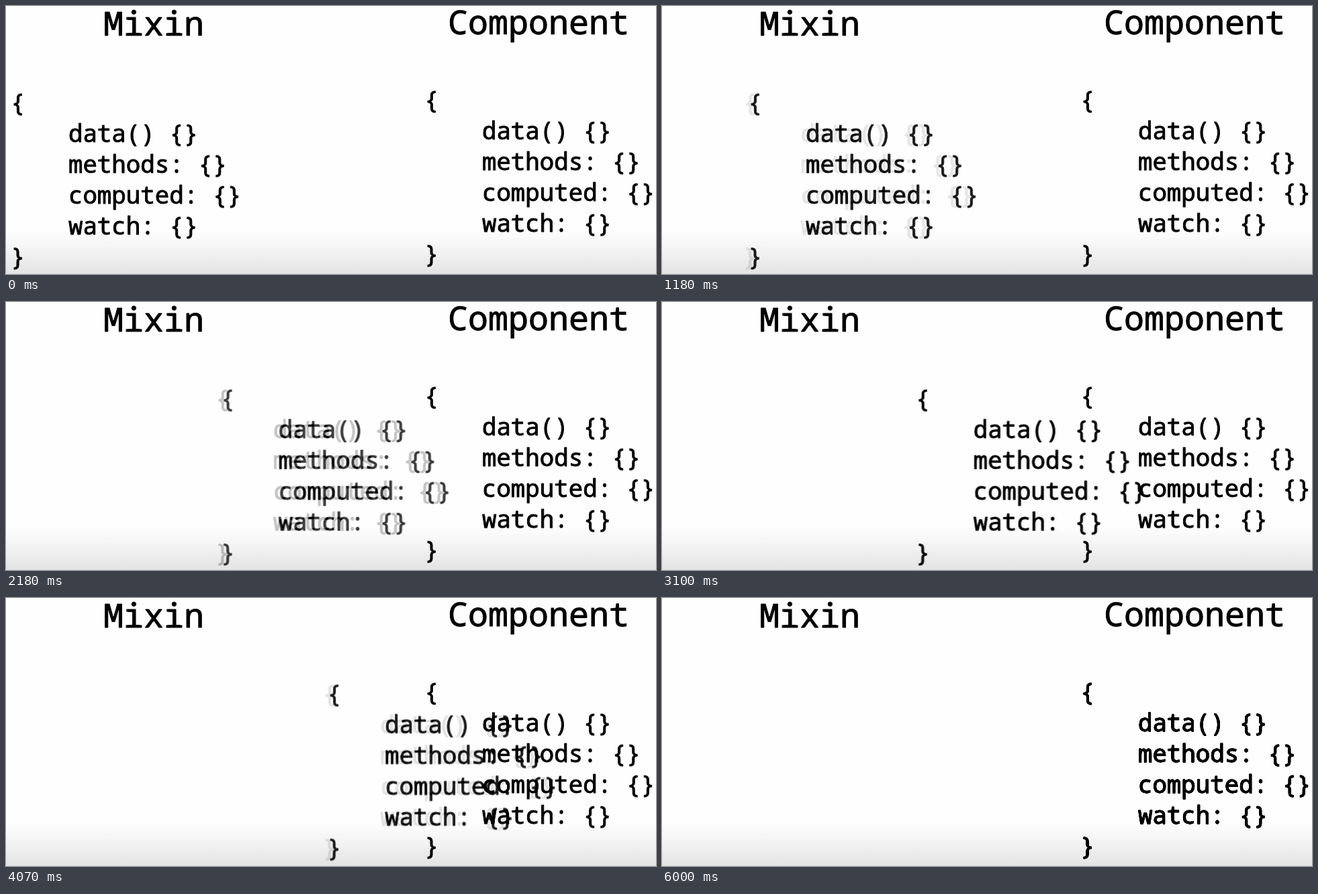
An HTML page with a canvas that plays this animation: 968 px wide and 400 px high, repeating every 8 s.

```html
<!DOCTYPE html>
<html lang="en">
<head>
<meta charset="utf-8">
<title>Mixin merge</title>
<style>
  html, body { margin: 0; width: 100%; height: 100%; overflow: hidden; }
  canvas { display: block; background: linear-gradient(#fefefe 334px, #f5f5f5 360px, #e3e3e3 400px); }
</style>
</head>
<body>
<canvas id="stage" width="968" height="400"></canvas>
<script>
const ctx = document.getElementById('stage').getContext('2d');
const LOOP = 8000, START = 500, STEP = 52.3, RATE = 1.309;
const LEFT = 7, TOP = 157;

// strokes of the drag; a power above 1 speeds up, below 1 slows down
const drag = [
  { from: 500, to: 2180, dist: 313, power: 1.05 },
  { from: 2180, to: 2540, dist: 41, power: 0.75 },
  { from: 2880, to: 3660, dist: 58, power: 0.84 },
  { from: 3660, to: 4790, dist: 204, power: 1.18 },
];

const progress = (t, from, to) => Math.min(1, Math.max(0, (t - from) / (to - from)));
const dragX = t => drag.reduce((x, s) => x + s.dist * progress(t, s.from, s.to) ** s.power, 0);
const dragY = t => -4 * progress(t, 3660, 4790);

function text(c, str, x, y, size) {
  c.font = `${size}px "Noto Sans Mono", "DejaVu Sans Mono", monospace`;
  c.lineWidth = 0.9;
  c.lineJoin = 'round';
  c.fillText(str, x, y);
  c.strokeText(str, x, y);
}

// the code block is drawn once, so that it can be faded as a whole
const block = document.createElement('canvas');
block.width = 360;
block.height = 290;
['{', '    data() {}', '    methods: {}', '    computed: {}', '    watch: {}', '}']
  .forEach((line, i) => text(block.getContext('2d'), line, 2, 40 + i * 46, 35.8));

function placeBlock(dx, dy, alpha) {
  ctx.globalAlpha = alpha;
  ctx.drawImage(block, LEFT - 2 + dx, TOP - 40 + dy);
  ctx.globalAlpha = 1;
}

function draw(t) {
  ctx.globalCompositeOperation = 'source-over';
  ctx.clearRect(0, 0, 968, 400);
  text(ctx, 'Mixin', 145, 44, 50);
  text(ctx, 'Component', 658, 42, 50);
  ctx.globalCompositeOperation = 'lighter'; // alphas add up, so faded copies sum to full black
  placeBlock(616, -4, 1);

  // each shown step cross-fades two neighbouring positions
  const step = Math.floor((t - START) / STEP);
  const pos = Math.max(0, step * RATE - 0.116);
  const base = Math.floor(pos), mix = pos - base;
  for (const [k, alpha] of [[base, 1 - mix], [base + 1, mix]]) {
    const at = START + k * STEP / RATE;
    placeBlock(dragX(at), dragY(at), alpha);
  }
}

function tick() {
  draw(performance.now() % LOOP);
  requestAnimationFrame(tick);
}
tick();
</script>
</body>
</html>
```
